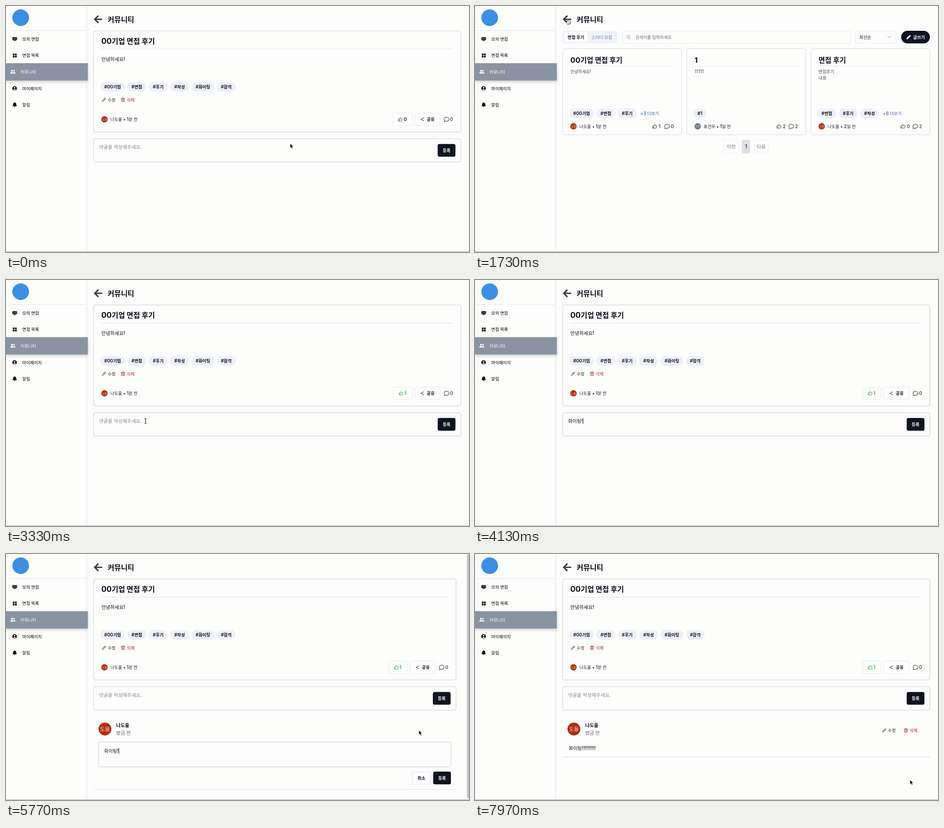
An HTML page for the animation above (8000 ms loop, 1025 by 546 pixels).

```html
<!DOCTYPE html>
<html lang="ko">
<head>
<meta charset="utf-8">
<style>
html, body { margin: 0; width: 100%; height: 100%; overflow: hidden; background: #fdfdfc; }
svg { display: block; width: 100vw; height: 100vh; font-family: Inter, "Noto Sans CJK KR", "Noto Sans CJK", "Noto Sans", sans-serif; }
</style>
</head>
<body>
<svg viewBox="0 0 1025 546">
  <defs>
    <filter id="soft" x="-10%" y="-20%" width="120%" height="170%"><feDropShadow dx="0" dy="3" stdDeviation="3" flood-opacity=".18"/></filter>
    <linearGradient id="edge"><stop stop-color="#eceef0"/><stop offset="1" stop-color="#fdfdfc"/></linearGradient>
  </defs>
  <g id="side"></g>
  <g id="page"></g>
  <path d="M0 545.5H1025" stroke="#a4a7ad"/>
  <g id="pointer"></g>
</svg>
<script>
const LOOP = 8000, INK = '#0b0f1c', GRAY = '#666d79', RED = '#b3202e', GREEN = '#22b04c', LINE = '#c8cbd3', PALE = '#e3e6ee';
const ME = '나도율', OTHER = '표건우';
const $ = id => document.getElementById(id);

// Text is centred vertically on y; Hangul is set slightly smaller than Latin.
const text = (x, y, size, s, fill = INK, weight = 500, more = '') =>
  `<text x="${x}" y="${y + size * .36}" font-size="${size}" fill="${fill}" font-weight="${weight}" ${more}>` +
  s.replace(/[가-힣ㄱ-ㅎ ]+/g, m => `<tspan font-size="${size * .94}" xml:space="preserve">${m}</tspan>`) + '</text>';
const mid = (x, y, size, s, fill, weight) => text(x, y, size, s, fill, weight, 'text-anchor="middle"');
const box = (x, y, w, h, r, fill = 'none', stroke = 'none') =>
  `<rect x="${x}" y="${y}" width="${w}" height="${h}" rx="${r}" fill="${fill}" stroke="${stroke}"/>`;
const disc = (x, y, r, fill) => `<circle cx="${x}" cy="${y}" r="${r}" fill="${fill}"/>`;
const rule = (x1, x2, y, color = '#dfe2ef') => `<path d="M${x1} ${y}H${x2}" stroke="${color}"/>`;

const ICONS = {
  thumb: 'M-5-1h2.2v5.5H-5zM-2.8-1-.6-5q2.4 0 1.2 3.6h4.2L3.7 4.5h-6.5',
  bubble: 'M-4 2.6A5.4 4.5 0 1 1-1 4.2Q-3 5.3-5 5-3.8 3.8-4 2.6z',
  pencil: 'M-4.8 4.8-4 1.6 2.2-4.6Q3.4-5.2 4.4-4.2 5.2-3.2 4.6-2.2L-1.6 4zM1-3l2.4 2.4M-1.6 1.6 1.6-1.6',
  trash: 'M-5-3H5M-1.7-3v-1.8h3.4V-3M-3.8-3l.5 8h6.6l.5-8M-1.2-.8v3.6M1.2-.8v3.6',
  share: 'M3-3.5-3 0 3 3.5M2.5-3.5h1M-3.5 0h1M2.5 3.5h1',
  glass: 'M3 2.2 5 4.6M-4.2-.4a3.9 3.9 0 1 0 7.8 0a3.9 3.9 0 1 0-7.8 0',
  down: 'M-4-2 0 2 4-2'
};
const icon = (name, x, y, color = '#333', scale = .85, fill = 'none') =>
  `<path transform="translate(${x} ${y}) scale(${scale})" d="${ICONS[name]}" fill="${fill}" stroke="${color}" stroke-width="1.1" stroke-linejoin="round" stroke-linecap="round"/>`;

const avatar = (x, y, r, name, color) => disc(x, y, r, color) + mid(x, y, r * .87, name.slice(1), '#f6ddd5', 400);
const author = (x, y, name, ago, color = '#b22d12') =>
  avatar(x + 7, y, 7, name, color) + text(x + 20, y, 10, `${name} • ${ago}`, '#1b1f28');
const darkButton = (x, y, label) => box(x, y, 39.3, 28.3, 4, '#0f141f') + mid(x + 19.6, y + 14.2, 10, label, '#fff', 600);
const editLinks = (x, y, gap = 42) => icon('pencil', x + 5, y, '#333', .8) + text(x + 13, y, 10, '수정', '#222') +
  icon('trash', x + 5 + gap, y, RED) + text(x + 13.4 + gap, y, 10, '삭제', RED);

function tags(x, y, list) {
  return list.map(tag => {
    const s = '#' + tag;
    const w = 18 + [...s].reduce((n, c) => n + (c > '가' ? 8.65 : c == '1' ? 4 : 6.5), 0);
    const out = box(x, y, w, 21, 10.5, '#eef0f8') + text(x + 9, y + 10.5, 10, s, INK, 600);
    x += w + 5.5;
    return out;
  }).join('');
}

function sidebar() {
  const ys = [73, 109.5, 146, 183, 219];
  const labels = ['모의 면접', '면접 목록', '커뮤니티', '마이페이지', '알림'];
  let s = disc(32.5, 26, 18.5, '#3c8fe2') + rule(0, 177, 54.5, '#e2e5f1') + box(177, 0, 5, 546, 0, 'url(#edge)');
  s += `<g filter="url(#soft)">${box(0, 127, 181.3, 38.5, 0, '#8994a2')}</g>`;
  labels.forEach((l, i) => s += text(i == 2 ? 32 : 36, ys[i], 10, l, i == 2 ? '#fff' : '#000'));
  s += box(14.5, 69.5, 9.5, 6, 1, '#444', '#111') + '<path d="M17 77h4.5" stroke="#111" stroke-width="1.2"/>';
  for (const x of [15, 19.8]) for (const y of [105.5, 110.3]) s += box(x, y, 3.9, 3.9, 1, '#111');
  s += '<path d="M9.5 150q0-3.5 3.7-3.5T17 150zM17.6 150q0-2-1-3.2 4.3-.7 4.3 3.2z" fill="#fff"/>' + disc(13.2, 143.8, 2, '#fff') + disc(17.6, 143.8, 1.8, '#fff');
  s += disc(19, 183, 5, '#111') + disc(19, 181.4, 1.6, '#fff') + '<path d="M16 186q3-3.5 6 0-3 2.4-6 0z" fill="#fff"/>';
  s += '<path d="M14.5 222q1.5-1 1.5-4 .4-3.4 3.2-3.4t3.2 3.4q0 3 1.5 4zM17.8 222.8h2.8l-1.4 1.3z" fill="#111" stroke="#111" stroke-width=".6"/>';
  return s;
}

const header = '<path d="M213 29.5H197M204.5 21.5 196.5 29.5 204.5 37.5" fill="none" stroke="#3f4043" stroke-width="3.2"/>' +
  text(225, 29.5, 17, '커뮤니티', INK, 700);

function listPage() {
  let s = header + box(194, 55, 121, 27.5, 4, '#eff2f8') + box(197, 58, 52.5, 22, 3, '#fdfdff') +
    text(205, 69, 10, '면접 후기', INK, 600) + text(258, 69, 10, '스터디 모집', '#6b7688') +
    box(326.5, 55.5, 504.5, 27.5, 4, 'none', PALE) + icon('glass', 340, 69, '#8a8f99') + text(355, 69, 10, '검색어를 입력하세요', GRAY) +
    box(842.5, 55.5, 89.5, 27.5, 4, 'none', PALE) + text(851, 69, 10, '최신순') + icon('down', 917, 69, '#888') +
    box(943.5, 55, 63.5, 28, 14, '#0b1222') + icon('pencil', 960, 69, '#fff', .85, '#fff') + text(970, 69, 10, '글쓰기', '#fff', 600);
  const cards = [
    [194, '00기업 면접 후기', ['안녕하세요!'], ['00기업', '면접', '후기'], 366, '+3 더보기', ME, '1분 전', 1, 0],
    [469, '1', ['11111'], ['1'], 0, '', OTHER, '1일 전', 2, 2],
    [743.5, '면접 후기', ['면접후기', '내용'], ['면접', '후기', '작성'], 903, '+6 더보기', ME, '2일 전', 0, 2]
  ];
  for (const [x, title, body, tagList, moreX, more, name, ago, likes, replies] of cards) {
    s += box(x, 94.5, 263.5, 191.3, 5, 'none', '#d5d8e2') + text(x + 17, 120, 16.5, title, INK, 700) + rule(x + 17, x + 246, 133.5);
    body.forEach((l, i) => s += text(x + 17, 145 + 14 * i, 10, l, '#454b56', 400));
    s += tags(x + 14.5, 228, tagList) + text(moreX, 238.5, 10, more, '#3a69bd') +
      author(x + 17, 267, name, ago, name == ME ? '#b22d12' : '#667c86') +
      icon('thumb', x + 204, 267, '#444', .9) + text(x + 212.5, 267, 10.5, '' + likes, '#333') +
      icon('bubble', x + 231, 267, '#444', 1) + text(x + 239.5, 267, 10.5, '' + replies, '#333');
  }
  const faint = '#eceef3';
  return s + box(551, 297.5, 32, 29, 3, 'none', faint) + mid(567, 312, 11.4, '이전', '#777b84', 400) +
    box(591, 297, 18, 30, 3, '#dcdfe6') + mid(600, 312, 11.4, '1', '#333') +
    box(617.5, 297.5, 32, 29, 3, 'none', faint) + mid(633.5, 312, 11.4, '다음', '#777b84', 400);
}

function detailPage({ liked, hover, draft, caret, comment, editing }) {
  const d = editing ? -10.7 : 0, right = 1007 + d, likeX = (liked ? 858 : 856) + d;
  const tone = liked ? GREEN : '#555';
  let s = header + box(194, 55.3, right - 194, 224.4, 4, 'none', LINE) +
    text(211, 78, 17, '00기업 면접 후기', INK, 700) + rule(211, right - 17.5, 95.5) +
    text(211, 118, 11.4, '안녕하세요!') +
    tags(208.5, 169, ['00기업', '면접', '후기', '작성', '화이팅', '합격']) +
    editLinks(212, 208) + author(211, 251.5, ME, '1분 전') +
    box(likeX, 237.7, 899 + d - likeX, 28, 4, hover ? '#eef1f9' : 'none', PALE) +
    icon('thumb', likeX + 17, 251.5, tone, .85) + text(likeX + (liked ? 24 : 24.5), 251.5, 10, liked ? '1' : '0', liked ? GREEN : INK, 600) +
    box(905 + d, 237.7, 56, 28, 4, 'none', PALE) + icon('share', 921.5 + d, 251.5, '#111', .85) + text(931.5 + d, 251.5, 10, '공유', INK, 600) +
    icon('bubble', 975 + d, 251.5, '#444', 1) + text(983 + d, 251.5, 10.5, '0', '#333') +
    box(194, 294.5, right - 194, 52, 4, 'none', LINE) + darkButton(955.7 + d, 306.2, '등록');
  const live = caret ? 'id="live"' : '';
  s += draft ? text(206, 313, 11.4, draft, INK, 400, live) : text(206, 313, 11.4, '댓글을 작성해주세요.', '#858992', 400);
  if (!comment) return s;
  s += avatar(219, 388.5, 14.2, ME, '#b22d12') + text(244, 380, 11.2, ME, INK, 600) + text(244, 397, 11.2, '방금 전', '#555b66', 400);
  if (!editing) return s + editLinks(901, 391.5, 48) + text(207.5, 430.5, 11.2, comment) + rule(194, right, 450.5, '#d2d4d9');
  return s + box(205, 417, 780, 55.5, 4, 'none', LINE) + text(217, 437, 11.2, comment, INK, 500, live) +
    box(899.5, 483.5, 41, 27.5, 4, '#fdfdff', PALE) + mid(919.7, 497, 10, '취소', INK, 600) + darkButton(945.7, 483, '등록') +
    rule(194, right, 522.5) + box(1018.5, 0, 6.5, 546, 0, '#f3f3f6') + box(1021, 1, 4, 541, 2, '#bfc1c7');
}

// Pointer stops: time, x, y.
const STOPS = [[0, 629, 305], [150, 629, 305], [700, 864, 257], [980, 864, 257], [1480, 205, 29], [1740, 205, 29],
  [2300, 231, 110], [2600, 231, 110], [3120, 309, 313], [5050, 309, 313], [5500, 914, 391], [7080, 914, 391], [7500, 963, 501], [8000, 963, 501]];
const HIDDEN = [[3440, 5050], [5980, 7080]];
const ARROW = '<path d="M0 0V10.5L2.4 8.3 4 12 6 11.1 4.4 7.6H7.6z" fill="#111" stroke="#fff" stroke-width=".8"/>';
const HAND = '<path d="M-1 0q1-1 2 0V4q1-.8 1.8 0 1-.6 1.8.3 1.5-.2 1.8 1.2V8q0 3-1.6 4H.2Q-2 9.4-3.8 7.2-4 5.8-2.6 6L-1 7.2z" fill="#fff" stroke="#222" stroke-width=".9"/><path d="M1.4 7.5v2.6M3 7.5v2.6M4.6 7.5v2.6" stroke="#222" stroke-width=".6"/>';
const BEAM = '<path d="M-2.5-5.5Q0-5.5 0-4 0-5.5 2.5-5.5M0-4.5V4.5M-2.5 5.5Q0 5.5 0 4 0 5.5 2.5 5.5" fill="none" stroke="#111"/>';
const within = (x, y, l, t, r, b) => x > l && x < r && y > t && y < b;

function pointerAt(t) {
  const i = STOPS.findIndex(p => p[0] > t);
  const [t0, x0, y0] = STOPS[i - 1], [t1, x1, y1] = STOPS[i];
  const u = (t - t0) / (t1 - t0), e = u * u * (3 - 2 * u);
  return [x0 + (x1 - x0) * e, y0 + (y1 - y0) * e];
}

const KEYS = ['', 'ㅎ', '호', '화', '황', '화이', '화잍', '화이티', '화이팅', '화이팅!'];
const typed = t => KEYS[Math.max(0, Math.min(9, Math.floor((t - 3400) / 80)))];

let last = '';
function draw(now) {
  const t = now % LOOP, [x, y] = pointerAt(t);
  const list = t >= 1660 && t < 2580, editing = t >= 5600 && t < 7720;
  const marks = Math.max(1, Math.min(9, 1 + Math.floor((t - 6000) / 130)));
  const state = {
    list, editing,
    liked: t >= 780,
    hover: within(x, y, 857, 238, 899, 266),
    draft: t >= 3400 && t < 4450 ? typed(t) : '',
    caret: t >= 3400 && t < 4450 || editing && (t < 7200 || t % 1000 < 500),
    comment: t >= 4500 && '화이팅' + '!'.repeat(marks)
  };
  const key = JSON.stringify(state);
  if (key != last) {
    last = key;
    $('page').innerHTML = list ? listPage() : detailPage(state);
    const live = $('live');
    if (live) {
      const cx = +live.getAttribute('x') + live.getComputedTextLength() + .5, cy = editing ? 437 : 313;
      $('page').insertAdjacentHTML('beforeend', `<path d="M${cx} ${cy - 6.5}v13" stroke="#222"/>`);
    }
  }
  const hand = !list && (state.hover || within(x, y, 899, 385, 932, 398) && !editing) || within(x, y, 195, 20, 214, 39) ||
    editing && within(x, y, 945, 483, 985, 511);
  const beam = !list && (within(x, y, 205, 307, 940, 340) || editing && within(x, y, 206, 418, 984, 472));
  const p = $('pointer');
  p.setAttribute('transform', `translate(${x} ${y})`);
  p.innerHTML = HIDDEN.some(([a, b]) => t >= a && t < b) ? '' : hand ? HAND : beam ? BEAM : ARROW;
}

$('side').innerHTML = sidebar();
const start = performance.now();
function tick() {
  draw(performance.now() - start);
  requestAnimationFrame(tick);
}
tick();
</script>
</body>
</html>
```
